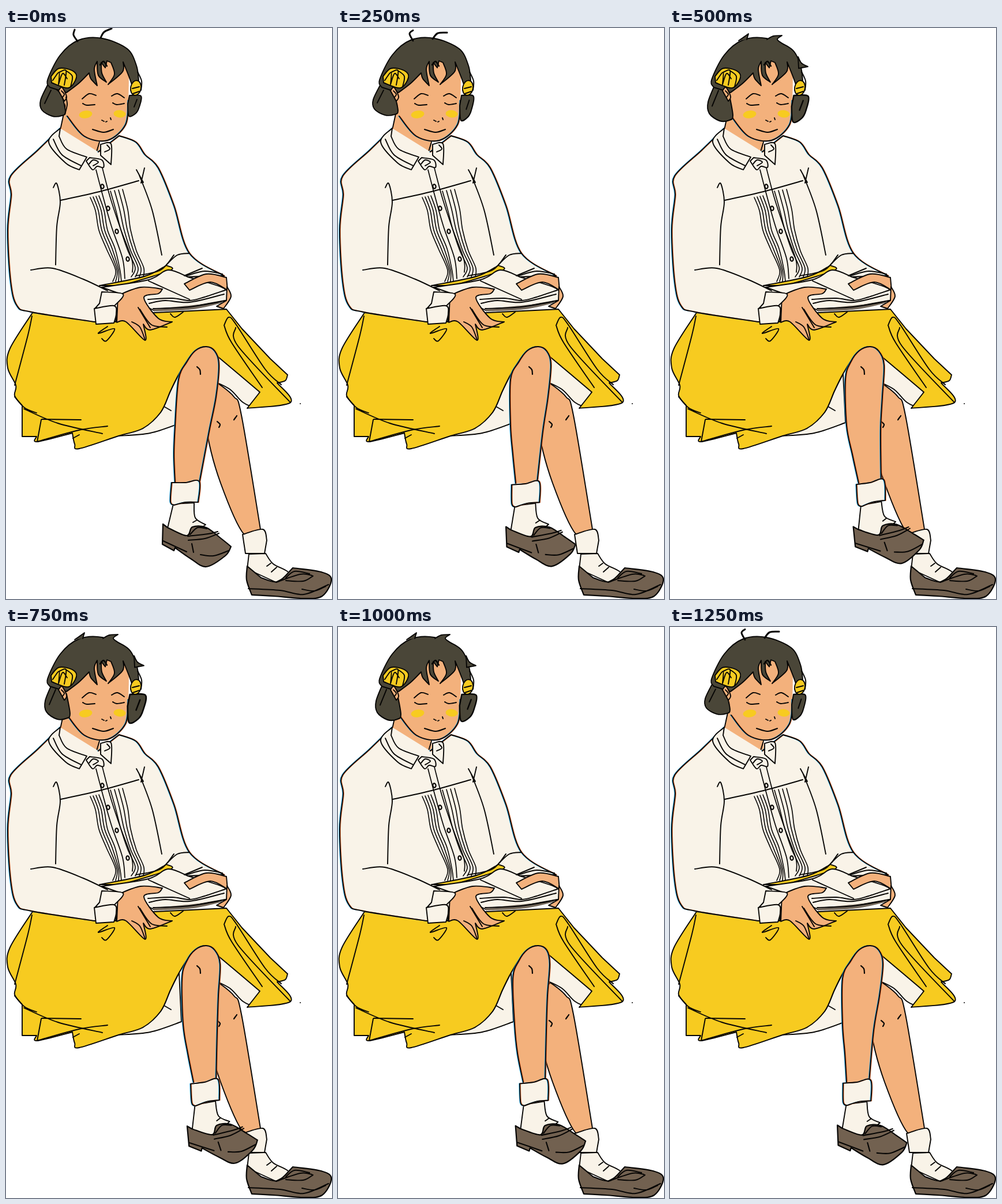
Recreate the animation shown at these times as an HTML page. Size 565x991 px, loop 1500 ms.

```html
<!DOCTYPE html>
<html lang="en">
<head>
<meta charset="utf-8">
<title>Reading girl</title>
<style>
  html, body { margin: 0; width: 100%; height: 100%; overflow: hidden; background: #fff; }
  svg { display: block; width: 100%; height: 100%; }
  path { stroke-linecap: round; stroke-linejoin: round; }
</style>
</head>
<body>
<svg id="stage" viewBox="0 0 565 991"></svg>
<script>
const INK = '#060504', SKIN = '#f3b17c', CREAM = '#f9f3e8', YELLOW = '#f7cb20',
      HAIR = '#4a4638', SHOE = '#726150';
const STEP = 250;

// Smooth curve through points; "/" makes a corner, ";" lifts the pen.
function trace(text) {
  return text.split(';').map(stroke => {
    let d = '', last;
    for (const run of stroke.split('/')) {
      const n = run.trim().split(/\s+/).map(Number), p = [];
      if (last) p.push(last); else d = `M${n[0]} ${n[1]}`;
      for (let i = 0; i < n.length; i += 2) p.push([n[i], n[i + 1]]);
      for (let i = 0; i < p.length - 1; i++) {
        const a = p[i - 1] || p[i], b = p[i], c = p[i + 1], e = p[i + 2] || c;
        const k = j => (b[j] + (c[j] - a[j]) / 6).toFixed(1);
        const m = j => (c[j] - (e[j] - b[j]) / 6).toFixed(1);
        d += `C${k(0)} ${k(1)} ${m(0)} ${m(1)} ${c[0]} ${c[1]}`;
      }
      last = p[p.length - 1];
    }
    return d;
  }).join('');
}

const line = (pts, w = 1.9, color = INK, extra = '') =>
  `<path d="${trace(pts)}" fill="none" stroke="${color}" stroke-width="${w}" ${extra}/>`;
const fill = (pts, color) => `<path d="${trace(pts)}Z" fill="${color}"/>`;
const shape = (pts, color, w = 1.9) =>
  `<path d="${trace(pts)}Z" fill="${color}" stroke="${INK}" stroke-width="${w}"/>`;
const oval = (x, y, rx, ry, color, turn = 0, w = 0) =>
  `<ellipse cx="${x}" cy="${y}" rx="${rx}" ry="${ry}" fill="${color}" stroke="${INK}" stroke-width="${w}" transform="rotate(${turn} ${x} ${y})"/>`;
// Ink line with colour misregistration on either side
const fringe = (pts, w = 1.9) =>
  line(pts, w, '#19a5e8', 'transform="translate(-1)" opacity=".75"') +
  line(pts, w, '#e0632a', 'transform="translate(1)" opacity=".75"') + line(pts, w);
const fringed = (pts, color) => fill(pts, color) + fringe(pts);

function backLeg() {
  return shape('368 617 395 640 408 672 441 870 / 412 878 372 790 349 705 345 640', SKIN) +
    line('366 683 371 688 369 693; 395 680 400 673', 2.2) +
    shape('421 913 418 939 / 468 962 / 490 946 463 930 450 912', CREAM) +
    shape('410 879 / 445 870 452 889 / 448 912 / 415 912', CREAM) +
    line('459 929 452 934; 469 936 460 944') +
    shape('418 934 417 958 426 984 / 464 986 514 990 548 986 564 957 546 944 497 937 / 471 961 442 954', SHOE, 2.2) +
    line('420 973 475 976 516 983 559 966; 468 962 510 948 530 950; 485 954 500 943 526 947; 485 959 515 960 532 951; 513 974 535 977 554 969', 2);
}

function skirt() {
  return shape('194 708 250 703 304 685 / 300 600 / 285 630 268 667 237 695', CREAM) +
    shape('362 564 440 630 / 430 655 411 650 388 627 360 613', CREAM) +
    line('267 653 286 664') +
    shape('46 494 7 556 3 590 17 620 15 638 28 655 / 28 709 / 53 709 / 54 718 115 703 / 119 722 127 730 195 708 237 695 268 667 285 630 300 600 320 570 345 553 369 572 440 632 / 418 660 / 493 650 470 616 / 484 612 488 602 / 458 574 / 409 522 / 382 488 / 240 495', YELLOW) +
    line('45 500 38 533 15 620; 15 640 32 659 53 668; 31 661 90 686 167 704; 61 680 54 718; 62 679 130 680') +
    line('54 718 126 698 176 691; 116 712 127 706') +
    line('378 516 386 502 399 515 449 592 477 619; 378 516 391 546 444 624; 398 520 402 552 493 650') +
    line('176 518 160 530 188 522 174 543 166 539; 285 496 293 502 307 493') +
    oval(510, 652, 1, 1, INK);
}

function pleats() {
  let s = '';
  for (let i = 0; i < 4; i++) {
    const a = 5 * i, b = 7 * i;
    s += line(`${146 + a} ${294 - i} ${155 + a} 317 ${161 + a} 351 ${174 + a} 383 ${190 + a / 2} 420 ${185 + a} 440`, 1.6);
    s += line(`${181 + b} ${283 - i} ${190 + b} 315 ${199 + b * .8} 350 ${211 + b * .7} 386 ${224 + b * .7} 416 ${217 + b} 432`, 1.6);
  }
  return s;
}

function blouse() {
  const buttons = [[167, 275], [177, 313], [192, 353], [211, 401]];
  return fringed('94 174 55 212 8 257 9 290 3 350 8 440 19 482 44 493 153 510 / 190 510 / 200 458 / 250 440 / 315 432 / 378 430 / 318 391 291 308 264 243 241 220 225 198 196 187 / 160 215', CREAM) +
    line('82 277 88 270 94 302 88 345 86 411; 95 299 162 284 230 265') +
    line('226 246 238 268; 240 243 234 269; 230 253 253 315 270 394; 318 391 297 394 278 411') +
    line('43 420 81 417 134 436 176 456') +
    line('156 246 168 292 183 345 202 400 206 435; 166 239 180 292 198 347 218 401 219 424', 1.7) +
    buttons.map(([x, y]) => oval(x, y, 2.6, 3.7, CREAM, -8, 2.2)).join('') +
    pleats() +
    shape('94 174 74 198 103 234 127 246 / 140 224 / 105 210 92 188', CREAM) +
    line('82 193 97 220 130 239') +
    shape('164 202 / 182 201 182 237 / 164 221', CREAM) +
    line('175 203 180 210 171 215') +
    shape('145 225 166 229 169 242 158 240 150 246 139 231', CREAM) +
    line('144 236 151 229 160 233 151 239');
}

function book() {
  return shape('162 447 240 431 278 412 / 284 421 200 447', YELLOW) +
    line('226 430 268 420 291 394') +
    shape('166 450 247 437 281 420 315 432 / 378 452 386 472 / 318 484 / 256 490 / 200 462', CREAM) +
    fill('256 488 325 481 383 475 / 325 488 256 492', '#72675a') +
    line('247 439 318 471; 246 471 288 469 318 473 344 467 380 455; 248 478 276 473 318 476 378 462; 255 487 318 484 382 473') +
    line('309 430 340 417; 313 430 344 422 375 427') +
    shape('309 444 347 427 382 433 / 384 455 / 354 441 318 455', SKIN) +
    shape('383 449 390 466 377 487 / 365 483 / 382 473', SKIN) +
    shape('194 464 233 450 271 453 / 264 461 239 468 264 504 288 510 / 250 524 238 514 / 241 542 208 510 192 511', SKIN) +
    line('229 485 250 520; 232 488 252 515 279 519; 218 510 232 519 241 541') +
    shape('166 458 / 203 462 188 482 / 154 487 / 162 478', CREAM) +
    shape('153 487 / 187 482 191 496 187 512 / 156 514', CREAM);
}

function face() {
  const jaw = '212 126 207 168 176 195 136 188 106 153';
  return fill('103 108 100 146 95 175 / 125 219 163 222 / 162 194', SKIN) +
    line('104 130 94 177; 162 198 155 221') +
    fill('106 153 / 106 112 145 50 205 52 213 80 / ' + jaw, SKIN) + fringe(jaw) +
    oval(138, 150, 11.5, 6.5, YELLOW, -8) + oval(197, 149, 10.5, 6.5, YELLOW, 6) +
    line('132 123 144 114 156 117; 183 118 193 114 205 121; 133 131 140 134 154 133; 185 130 192 133 205 131') +
    line('166 160 170 162; 173 163 175 162; 181 156 182 159') +
    line('150 176 169 181 186 176', 2.2);
}

const CAP = '76 103 72 90 94 47 126 21 167 18 210 36 226 65 230 91 / 218 98 / 213 84 203 59 / 202 76 177 98 / 188 80 182 60 / 175 57 / 172 69 / 165 60 / 166 78 174 94 / 160 82 158 58 / 153 72 158 100 / 147 88 144 78 / 126 96 105 112';

const wisps = ['119 3 117 12 124 23; 183 1 170 7 164 17', '130 4 124 10 130 22; 189 8 173 9 164 19'];
const spikes = '119 22 136 10 / 133 20; 168 20 179 14 194 13 / 186 20 198 29; 222 50 228 61 239 67 / 223 70';

// side locks: shift and stretch on the left, stretch on the right
const LOCKS = [
  { dx: 0, left: 1, wide: 1, right: 1 },
  { dx: 1, left: .96, wide: 1.03, right: 1.2 },
  { dx: 6, left: 1.17, wide: 1.25, right: 1.28 },
  { dx: 8, left: 1.14, wide: 1.35, right: 1.36 }
];

function head(kind) {
  const { dx, left, wide, right } = LOCKS[kind];
  const locks =
    `<g transform="translate(${dx} 105) scale(1 ${left})">` +
    shape('74 -10 60 20 62 37 80 48 97 47 103 40 97 10', HAIR) + line('78 3 67 26') + '</g>' +
    `<g transform="translate(212 117) scale(${wide} ${right})">` +
    shape('2 0 22 1 19 20 13 31 1 36 -1 15', HAIR) + line('15 7 10 20') + '</g>';
  return locks + shape(CAP, HAIR) +
    (kind > 1 ? shape(spikes, HAIR) : line(wisps[kind], 3)) +
    line('228 76 235 92 234 108') +
    line('163 64 169 58 175 66', 2.4) +
    shape('91 109 97 103 105 119 101 127', SKIN) + line('96 109 101 115 98 120') +
    (kind ? '' : line('104 120 106 133 102 150')) +
    shape('78 84 92 70 115 74 122 86 108 104 79 95', YELLOW) +
    line('81 91 92 77 91 98; 92 77 104 74 101 99; 104 74 115 84 112 102; 91 98 98 79 106 88') +
    oval(225, 104, 9, 13, YELLOW, 10, 1.9) +
    line('219 105 231 102; 220 114 231 110');
}

function foot() {
  return shape('290 826 280 868 / 315 882 346 862 / 328 850 326 824', CREAM) +
    fringed('287 789 / 311 789 335 787 333 823 / 312 823 291 828 / 285 822 287 789', CREAM) +
    line('331 854 324 858') +
    shape('272 861 271 896 / 291 907 / 293 902 / 320 921 347 935 380 916 390 900 / 374 887 347 867 323 866 313 881 280 867', SHOE, 2.2) +
    line('272 890 313 909; 315 882 350 878 367 874; 316 889 345 886 369 877; 319 879 332 867 348 869; 322 895 325 910; 337 914 360 916 386 907', 2.1);
}

// shin edges from top to bottom, foot as dx, dy, turn, and the hair style
const POSES = [
  { l: [299, 293, 291, 293], r: [369, 364, 352, 335], foot: [0, 0, 0], hair: 0 },
  { l: [299, 299, 303, 308], r: [369, 364, 355, 345], foot: [14, 2, -4], hair: 1 },
  { l: [304, 306, 316, 327], r: [371, 368, 365, 366], foot: [36, 0, -7.5], hair: 2 },
  { l: [305, 307, 315, 325], r: [371, 368, 366, 364], foot: [33, 1, -7], hair: 3 },
  { l: [303, 306, 311, 321], r: [367, 363, 361, 359], foot: [28, 1, -6], hair: 2 },
  { l: [299, 299, 303, 306], r: [369, 363, 353, 345], foot: [13, 1, -4], hair: 1 }
];

function frontLeg({ l, r, foot: [dx, dy, turn] }) {
  const up = [790, 740, 690, 610].map((y, k) => `${l[3 - k]} ${y}`).join(' ');
  const down = [585, 640, 700, 790].map((y, k) => `${r[k]} ${y}`).join(' ');
  return fringed(`${up} 313 580 328 560 347 553 362 561 ${down}`, SKIN) +
    line('331 588 336 593 337 601', 2.2) +
    `<g transform="translate(${dx} ${dy}) rotate(${turn} 311 790)">${foot()}</g>`;
}

const layer = (name, draw) =>
  POSES.map(p => `<g class="${name}" display="none">${draw(p)}</g>`).join('');
const stage = document.getElementById('stage');
stage.innerHTML = backLeg() + skirt() + layer('leg', frontLeg) + face() + blouse() + book() +
  layer('head', p => head(p.hair));

const sets = ['.leg', '.head'].map(s => [...stage.querySelectorAll(s)]);
let shown = -1;
function tick() {
  const now = Math.floor(performance.now() / STEP) % POSES.length;
  if (now !== shown) {
    for (const set of sets) set.forEach((g, i) => g.setAttribute('display', i === now ? 'inline' : 'none'));
    shown = now;
  }
  requestAnimationFrame(tick);
}
tick();
</script>
</body>
</html>
```
